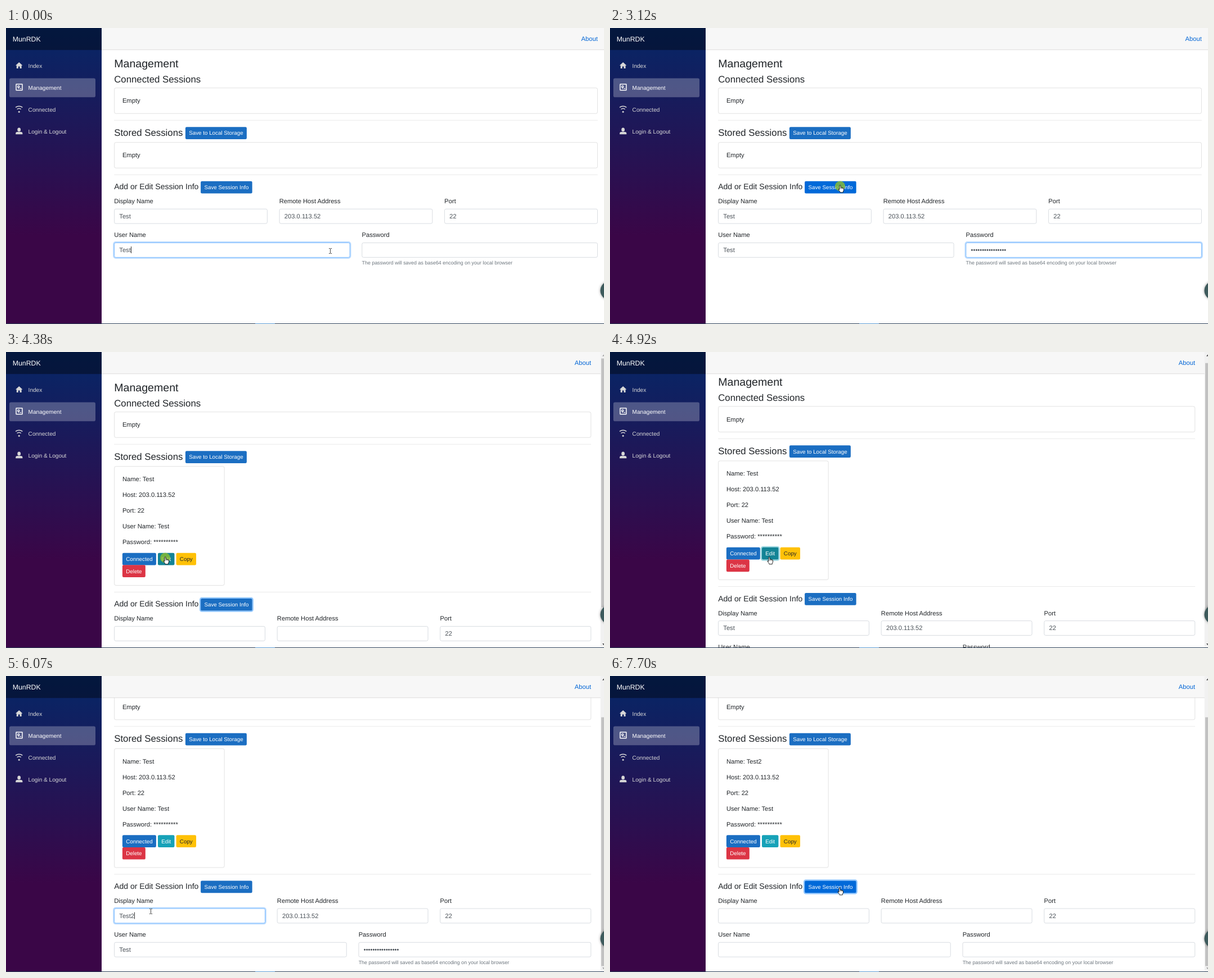
Write an HTML page with a canvas that moves like this. It is 1063 by 527 pixels and loops after 9.32 s.

```html
<!DOCTYPE html>
<html lang="en">
<head>
<meta charset="utf-8">
<title>Session management</title>
<style>
html, body { margin: 0; width: 100%; height: 100%; overflow: hidden; background: #fff; }
canvas { display: block; width: 1063px; height: 527px; }
</style>
</head>
<body>
<canvas id="stage" width="1063" height="527"></canvas>
<script>
const c = document.getElementById('stage').getContext('2d');
const W = 1063, H = 527, LOOP = 9320, STEP = 77;
const FONT = '"Liberation Sans", Arial, sans-serif';
const BASE = 11.2, SMALL = 9.8, LEFT = 192.2, MAX_SCROLL = 74.4;
const BRAND = 'MunRDK', HOST = '203.0.113.52', DOTS = '•'.repeat(16);
const INK = '#212529', FIELD = '#495057';

const THEMES = {
  primary: ['#1b6ec2', '#0069d9', '#fff', 'rgba(38,143,255,.5)'],
  info: ['#17a2b8', '#138496', '#fff', 'rgba(58,176,195,.5)'],
  warning: ['#ffc107', '#e0a800', INK, 'rgba(222,170,12,.5)'],
  danger: ['#dc3545', '#c82333', '#fff', 'rgba(225,83,97,.5)']
};

// start, steps, end point
const MOVES = [
  [910, 6, 747, 404], [2440, 8, 409, 280], [3760, 7, 283, 365],
  [5680, 2, 257, 419], [6150, 8, 409, 378], [7700, 1, 408, 377]
];
const CLICKS = [[1370, 1600], [3050, 3360], [4300, 4610], [5680, 5840], [6920, 7240]];
const FOCUS = [
  [0, 'user'], [1450, 'password'], [3210, 'save'], [4530, 'edit'],
  [5840, 'name'], [7000, 'save']
];
const CARETS = [[0, 360], [910, 1450], [1450, 2060], [5840, 6600]];

const smooth = u => u * u * (3 - 2 * u);
const within = (t, spans) => spans.some(([a, b]) => t >= a && t < b);
const inside = (p, x, y, w, h) => p.x >= x && p.x <= x + w && p.y >= y && p.y <= y + h;
const stepAt = (t, start) => Math.floor((t - start) / STEP);

let now, mouse, kind, focus;

function pointerAt(t) {
  let x = 576, y = 397;
  for (const [start, n, ex, ey] of MOVES) {
    if (t < start) break;
    const u = smooth(Math.min(1, (stepAt(t, start) + 1) / n));
    x += (ex - x) * u;
    y += (ey - y) * u;
  }
  return { x, y };
}

function scrollAt(t) {
  if (t < 4920) return 0;
  return MAX_SCROLL * smooth(Math.min(1, (stepAt(t, 4920) + 2.07) / 9.07));
}

function setFont(size) {
  c.font = `${size}px ${FONT}`;
  c.textRendering = 'geometricPrecision';
}

function widthOf(str, size) {
  setFont(size);
  return c.measureText(str).width;
}

function text(str, x, mid, size = BASE, color = INK) {
  setFont(size);
  c.fillStyle = color;
  c.fillText(str, x, mid + size * 0.3465);
}

function rect(x, y, w, h, color) {
  c.fillStyle = color;
  c.fillRect(x, y, w, h);
}

function box(x, y, w, h, r, fill, stroke, line = 0.8) {
  c.beginPath();
  c.roundRect(x, y, w, h, r);
  if (fill) { c.fillStyle = fill; c.fill(); }
  if (stroke) { c.strokeStyle = stroke; c.lineWidth = line; c.stroke(); }
}

function shape(points, fill, stroke, line = 0.8) {
  c.beginPath();
  points.forEach(([x, y]) => c.lineTo(x, y));
  c.closePath();
  if (fill) { c.fillStyle = fill; c.fill(); }
  if (stroke) { c.strokeStyle = stroke; c.lineWidth = line; c.stroke(); }
}

function disc(x, y, r, color) {
  c.beginPath();
  c.arc(x, y, r, 0, 7);
  c.fillStyle = color;
  c.fill();
}

function button(label, x, y, theme, id) {
  const [normal, dark, ink, ring] = THEMES[theme];
  const w = widthOf(label, SMALL) + 12.6, h = 21.7;
  const hover = inside(mouse, x, y, w, h);
  if (hover) kind = 'hand';
  if (id && id === focus) box(x - 1.1, y - 1.1, w + 2.2, h + 2.2, 3.2, null, ring, 2.2);
  box(x, y, w, h, 2.2, hover ? dark : normal);
  text(label, x + 6.3, y + h / 2, SMALL, ink);
  return x + w + 3.1;
}

function field(label, value, x, y, w, id) {
  const top = y + 22, h = 26.6, active = id === focus;
  if (inside(mouse, x, top, w, h)) kind = 'beam';
  text(label, x, y + 8.4);
  if (active) box(x - 0.8, top - 0.8, w + 1.6, h + 1.6, 3.5, null, 'rgba(0,123,255,.28)', 2.4);
  box(x + 0.35, top + 0.35, w - 0.7, h - 0.7, 2.6, '#fff', active ? '#80bdff' : '#ced4da', active ? 1 : 0.8);
  text(value, x + 9.1, top + h / 2, BASE, FIELD);
  if (active && within(now, CARETS)) {
    rect(Math.round(x + 9 + widthOf(value, BASE)), Math.round(top + 7.3), 1, 12, '#333');
  }
}

function card(y, w, h) {
  box(LEFT + 0.35, y + 0.35, w - 0.7, h - 0.7, 2.8, '#fff', 'rgba(0,0,0,.15)');
}

function rule(y, right) {
  rect(LEFT, y, right - LEFT, 0.8, 'rgba(0,0,0,.11)');
}

function storedCard(name) {
  card(203.4, 196.3, 212.4);
  const x = 206.9;
  const rows = ['Name: ' + name, 'Host: ' + HOST, 'Port: 22', 'User Name: Test', 'Password: **********'];
  rows.forEach((row, i) => text(row, x, 226.3 + 28 * i));
  let bx = button('Connected', x, 357.7, 'primary');
  bx = button('Edit', bx, 357.7, 'info', 'edit');
  button('Copy', bx, 357.7, 'warning');
  button('Delete', x, 379.3, 'danger');
}

function form(y, right, v) {
  const full = right - LEFT, third = (full - 42) / 3, half = (full - 21) / 2;
  text('Add or Edit Session Info', LEFT, y + 9.7, 14);
  button('Save Session Info', 346.1, y, 'primary', 'save');
  const r1 = y + 27.2, r2 = y + 87.4;
  field('Display Name', v.name, LEFT, r1, third, 'name');
  field('Remote Host Address', v.host, LEFT + third + 21, r1, third, 'host');
  field('Port', '22', LEFT + 2 * (third + 21), r1, third, 'port');
  field('User Name', v.user, LEFT, r2, half, 'user');
  const px = LEFT + half + 21;
  field('Password', v.password, px, r2, half, 'password');
  text('The password will saved as base64 encoding on your local browser', px, r2 + 57.6, 8.96, '#6c757d');
}

function values(t) {
  if ((t >= 3290 && t < 4530) || t >= 7080) return { name: '', host: '', user: '', password: '' };
  return {
    name: t >= 6070 ? 'Test2' : 'Test',
    host: HOST,
    user: 'Test',
    password: t >= 2060 ? DOTS : ''
  };
}

function content(t, right, scroll) {
  const saved = t >= 3290;
  c.save();
  c.translate(0, -scroll);
  mouse.y += scroll;
  text('Management', LEFT, 63.3, 19.6);
  text('Connected Sessions', LEFT, 90.7, 16.8);
  card(106.4, right - LEFT, 46.2);
  text('Empty', 206.9, 129.5);
  rule(163.8, right);
  text('Stored Sessions', LEFT, 185.7, 16.8);
  button('Save to Local Storage', 318.9, 176.2, 'primary');
  if (saved) {
    storedCard(t >= 7080 ? 'Test2' : 'Test');
  } else {
    card(203.4, right - LEFT, 46.2);
    text('Empty', 206.9, 226.3);
  }
  const drop = saved ? 166.2 : 0;
  rule(260.8 + drop, right);
  form(272.7 + drop, right, values(t));
  mouse.y -= scroll;
  c.restore();
}

function homeIcon(y, color) {
  shape([[23.2, y - 5.8], [29.5, y], [27.6, y], [27.6, y + 5.2], [24.6, y + 5.2], [24.6, y + 1.6],
    [21.8, y + 1.6], [21.8, y + 5.2], [18.8, y + 5.2], [18.8, y], [17, y]], color);
}

function panelIcon(y, color) {
  box(18, y - 6, 11, 10.8, 0.5, null, color, 1.5);
  c.beginPath();
  c.arc(22.3, y - 1.6, 1.6, 0, 7);
  c.lineWidth = 1.3;
  c.stroke();
  rect(24.4, y + 1.2, 2.9, 1.2, color);
  rect(21.7, y, 1.2, 2.2, color);
}

function wifiIcon(y, color) {
  c.strokeStyle = color;
  c.lineWidth = 1.5;
  for (const r of [10, 5.8]) {
    c.beginPath();
    c.arc(23.2, y + 4, r, -Math.PI * 0.71, -Math.PI * 0.29);
    c.stroke();
  }
  disc(23.2, y + 4, 1.5, color);
}

function personIcon(y, color) {
  c.beginPath();
  c.ellipse(23.2, y - 3.4, 2.9, 3.5, 0, 0, 7);
  c.fillStyle = color;
  c.fill();
  box(17.2, y + 0.7, 12.2, 4.2, [2.8, 2.8, 0, 0], color);
}

function sidebar() {
  const g = c.createLinearGradient(0, 0, 0, H);
  g.addColorStop(0, '#052767');
  g.addColorStop(0.7, '#3a0647');
  rect(0, 0, 170, H, g);
  rect(0, 0, 170, 39.2, 'rgba(0,0,0,.4)');
  text(BRAND, 11.7, 19.6, 12.32, '#fff');
  box(6, 89.6, 153, 33.6, 2.8, 'rgba(255,255,255,.25)');
  const items = [['Index', homeIcon], ['Management', panelIcon], ['Connected', wifiIcon], ['Login & Logout', personIcon]];
  items.forEach(([label, icon], i) => {
    const y = 67.2 + 39.2 * i, color = i === 1 ? '#fff' : '#d7d7d7';
    icon(y - 0.4, color);
    text(label, 39.6, y, 10.08, color);
  });
}

function topBar(right) {
  rect(170, 0, W - 170, 38.6, '#f7f7f7');
  rect(170, 38.4, W - 170, 0.8, '#d6d5d5');
  text('About', right - widthOf('About', BASE), 19.4, BASE, '#0366d6');
}

function scrollbar(scroll) {
  rect(1056.8, 0, 7, H, '#f1f1f1');
  rect(1058.1, 11.5 + scroll * 62 / MAX_SCROLL, 5, 443, '#c1c1c1');
  const arrow = (y, d, on) => shape([[1059.8, y + d], [1062.6, y - 2 * d], [1065.4, y + d]], on ? '#505050' : '#a3a3a3');
  arrow(6.5, 1, scroll > 0);
  arrow(520, -1, scroll < MAX_SCROLL);
}

function edgeBadge() {
  c.save();
  c.shadowColor = 'rgba(0,0,0,.45)';
  c.shadowBlur = 4;
  disc(1073, 467.5, 16.5, '#3d5a5c');
  c.restore();
}

function taskbar() {
  rect(0, 526, W, 1, '#2b3f58');
  rect(443, 526, 35, 1, '#5b9bd5');
}

function cursor() {
  c.save();
  c.translate(Math.round(mouse.x), Math.round(mouse.y));
  c.lineJoin = 'round';
  if (kind === 'beam') {
    const ink = '#444';
    rect(0, -4, 1, 8, ink);
    for (const y of [-5, 4]) {
      rect(-2, y, 2, 1, ink);
      rect(1, y, 2, 1, ink);
    }
  } else if (kind === 'hand') {
    shape([[-1, 0.4], [0, -0.2], [1, 0.4], [1.1, 4], [3, 4.2], [5, 4.8], [6.4, 5.6], [6.6, 9],
      [5.4, 11], [5.3, 12.8], [0, 12.8], [-0.4, 11.2], [-3, 7.8], [-2.8, 6.6], [-1, 7.8]], '#fff', '#111', 0.9);
    c.beginPath();
    for (const x of [1.1, 3, 4.8]) {
      c.moveTo(x, 4.4);
      c.lineTo(x, 6.6);
    }
    c.lineWidth = 0.6;
    c.stroke();
  } else {
    shape([[0, 0], [0, 11.4], [2.6, 9], [4.3, 12.8], [6, 12], [4.3, 8.3], [7.9, 8.1]], '#fff', '#111', 0.8);
  }
  c.restore();
}

function draw(t) {
  now = t;
  mouse = pointerAt(t);
  kind = 'arrow';
  focus = FOCUS.filter(f => t >= f[0]).pop()[1];
  const saved = t >= 3290, right = saved ? 1040.1 : 1051.8, scroll = scrollAt(t);
  rect(0, 0, W, H, '#fff');
  content(t, right, scroll);
  topBar(right);
  sidebar();
  if (saved) scrollbar(scroll);
  edgeBadge();
  taskbar();
  if (within(t, CLICKS)) disc(mouse.x, mouse.y + 1.5, 9, 'rgba(140,190,45,.8)');
  if (t < 2290 || t >= 2440) cursor();
}

function frame() {
  draw(performance.now() % LOOP);
  requestAnimationFrame(frame);
}
frame();
</script>
</body>
</html>
```
